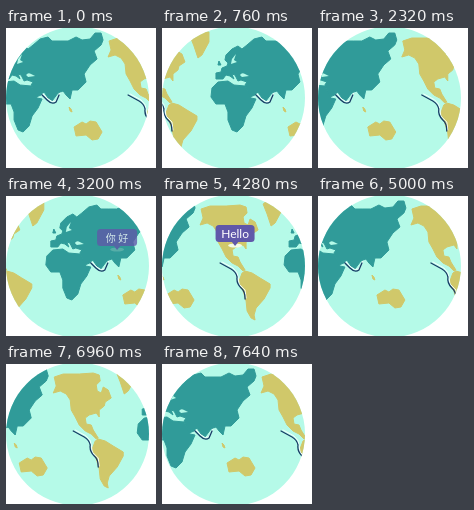
Recreate the animation shown at these times as an HTML page. Size 150 by 140 pixels, loop 7680 ms.

```html
<!DOCTYPE html>
<html lang="en">
<head>
<meta charset="utf-8">
<title>Greetings around the globe</title>
<style>
  html, body { margin: 0; width: 100%; height: 100%; overflow: hidden; background: #fff; }
  svg { display: block; width: 100%; height: 100%; }
  .teal { fill: #309b99; stroke: #309b99; }
  .sand { fill: #d0c86a; stroke: #d0c86a; }
  .teal, .sand { stroke-linejoin: round; }
  .sea { fill: #b5fae8; }
  .route { fill: none; stroke: #173c66; stroke-width: 1.3; stroke-linejoin: round; stroke-linecap: round; }
  .foam { stroke: #f4fffc; stroke-width: 1; }
  .label rect, .label path { fill: #6058a9; }
  .label ellipse { fill: #f4fbe8; }
  .label text { fill: #fff; text-anchor: middle; font-family: Lato, "Noto Sans CJK SC", "Noto Sans CJK", sans-serif; }
</style>
</head>
<body>
<svg viewBox="0 0 150 140">
  <defs>
    <clipPath id="disc"><circle cx="71.5" cy="70" r="71.5"/></clipPath>
    <g id="map">
      <!-- Africa, Eurasia, Black Sea, Britain -->
      <path class="teal" d="M-2 54L-8 60L-9 69L-4 76L5 76L8 84L8 92L12 102L17 104L23 98L26 88L32 80L36 71L31 70L25 58L14 57L8 53Z"/>
      <path class="teal" d="M-4 51L-4 45L1 44L2 40L7 38L8 35L5 32L6 27L12 21L18 18L22 21L27 17L34 11L42 9L46 13L54 13L62 13L70 9L76 12L84 11L89 5L95 5L97 12L95 17L88 23L91 31L84 37L78 46L80 54L72 62L66 62L64 71L60 67L57 63L52 65L46 73L42 70L38 64L35 67L30 69L25 57L27 54L21 52L18 53L15 47L12 46L14 51L10 48L6 47L3 51Z"/>
      <path class="sea" d="M20 47Q22 44 25 46L29 48L22 49ZM11 36L12 31L16 26L14 32L17 34Z"/>
      <path class="teal" d="M-2 37L-1 33L1 37Z"/>
      <!-- Americas and Greenland -->
      <path class="sand" d="M103 13L112 10L128 10L142 9L148 11L149 17L145 21L146 27L150 29L152 23L157 26L160 34L154 38L153 42L148 46L148 53L145 49L138 51L134 54L135 60L140 61L142 66L147 74L145 75L140 70L134 67L128 61L124 53L120 46L119 36L115 30L109 27L102 29L105 22Z"/>
      <path class="sand" d="M144 77L147 75L154 77L162 82L172 88L172 92L166 103L158 112L156 119L157 124L153 122L149 115L148 105L145 95L141 85Z"/>
      <path class="sand" d="M165 8L170 4L184 4L184 14L177 27L173 30L169 18Z"/>
      <!-- Australia and islands -->
      <path class="sand" d="M68 99L76 94L80 96L84 93L90 94L96 104L92 111L86 112L80 107L70 108Z"/>
      <path class="sand" d="M63 79L65 81L66 84L64 83Z"/>
      <!-- Sea routes -->
      <path class="route foam" d="M37 66L42 71Q46 75 50 73L54 65M124 66L135 72Q140 76 140 81L141 88L147 94L148 102"/>
      <path class="route" d="M36 67L41 72Q46 77 50 74L53 67M122 67L133 73Q138 76 139 81Q138 87 143 92Q147 95 147 103"/>
    </g>
  </defs>
  <g clip-path="url(#disc)">
    <rect class="sea" width="150" height="140"/>
    <use class="world" href="#map"/>
    <use class="world" href="#map"/>
    <g id="labels"></g>
  </g>
</svg>
<script>
const LOOP = 7680, TURN = 2560, WIDTH = 195, SPEED = WIDTH / TURN;
const worlds = document.querySelectorAll(".world");

// x: screen position at time `at`; each label drifts along with the map
const labels = [
  { text: "你 好", x: 111, y: 53, at: 3200, from: 2400, to: 3360, w: 40, size: 10 },
  { text: "Hello", x: 73, y: 49, at: 4280, from: 3840, to: 4760, w: 39, size: 12 },
  { text: "Bonjour", x: 90, y: 47, at: 6320, from: 5600, to: 6640, w: 47, size: 10.5 }
];

for (const l of labels) {
  l.node = document.createElementNS("http://www.w3.org/2000/svg", "g");
  l.node.setAttribute("class", "label");
  l.node.innerHTML = `<ellipse cy="0.5" rx="7" ry="2"/>
    <rect x="${-l.w / 2}" y="-20" width="${l.w}" height="17" rx="3.5"/>
    <path d="M-4 -4H4L0 1Z"/>
    <text y="-7.5" font-size="${l.size}">${l.text}</text>`;
  l.glow = l.node.querySelector("ellipse");
  document.getElementById("labels").append(l.node);
}

const clamp = v => Math.max(0, Math.min(1, v));

function draw(now) {
  const t = now % LOOP;
  const shift = t * SPEED % WIDTH;
  worlds.forEach((w, i) => w.setAttribute("transform", `translate(${shift - i * WIDTH})`));
  for (const l of labels) {
    const show = Math.min(clamp((t - l.from) / 160), clamp((l.to - t) / 200));
    const x = l.x + (t - l.at) * SPEED;
    l.node.setAttribute("opacity", show);
    l.glow.setAttribute("opacity", show ** 6);
    l.node.setAttribute("transform", `translate(${x} ${l.y})`);
  }
}

const start = performance.now();
function tick() {
  draw(performance.now() - start);
  requestAnimationFrame(tick);
}
tick();
</script>
</body>
</html>
```
